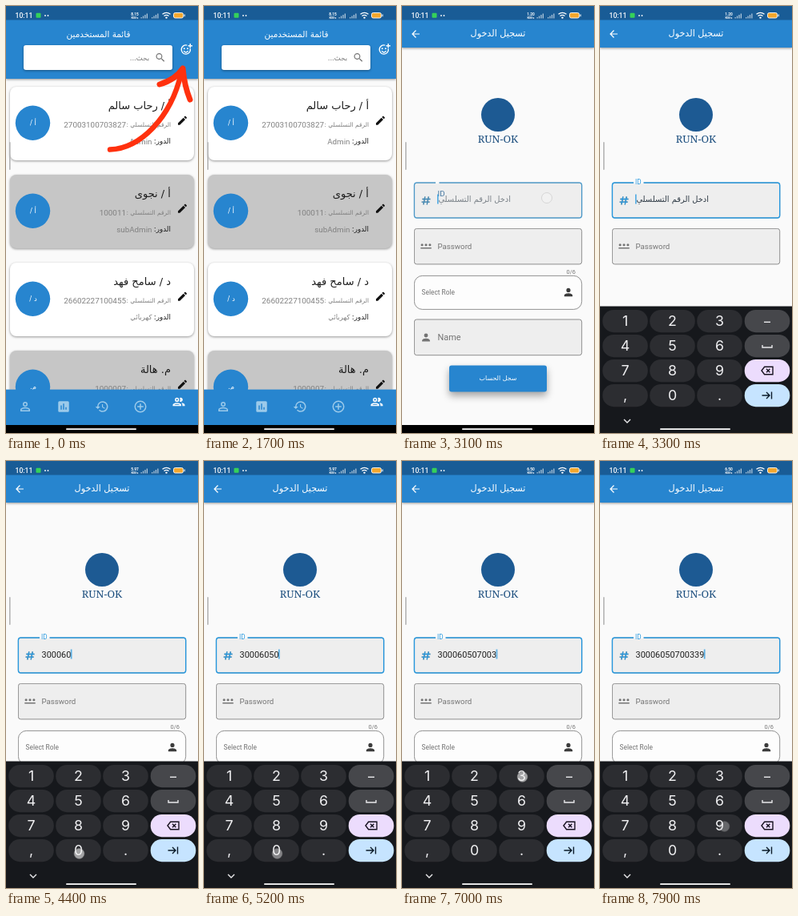
These frames come from a looping animation (240x534 px, 8000 ms). An HTML page:

```html
<!DOCTYPE html>
<html lang="ar">
<head>
<meta charset="utf-8">
<title>تسجيل الدخول</title>
<style>
html, body { margin: 0; width: 100%; height: 100%; overflow: hidden; background: #000; }
svg { display: block; width: 100vw; height: 100vh; }
text { font-family: Roboto, 'DejaVu Sans', sans-serif; }
.ar { font-family: 'DejaVu Sans', sans-serif; direction: rtl; }
.cap { font-family: Inter, sans-serif; }
.mark { font-family: 'Noto Serif', serif; }
.mid { text-anchor: middle; }
.end { text-anchor: end; }
.blue { fill: #2785cf; }
.soft { filter: drop-shadow(0 1px 1.5px rgba(0,0,0,.4)); }
.lift { filter: drop-shadow(0 5px 5px rgba(0,0,0,.35)); }
.box { fill: #eee; stroke: #757575; stroke-width: .8; }
#list, #form, #scrim, #keys, #focus, #label, #gap, #hint { animation: 8s linear infinite; }
#list, #form { transform-origin: 120px 265px; }
#list { animation-name: list; }
#scrim { animation-name: scrim; }
#form { animation-name: form; }
#keys { animation-name: keys; }
#focus { animation-name: focus; }
#label { animation-name: label; }
#gap { animation-name: gap; transform-origin: 42px 0; }
#hint { animation-name: hint; }
@keyframes list { 0%, 23% { transform: none } 26.5%, 100% { transform: scale(1.05) } }
@keyframes scrim { 0%, 23% { opacity: 0 } 25%, 100% { opacity: .6 } }
@keyframes form {
  0%, 23% { transform: scale(.85); opacity: 0 }
  24% { transform: scale(.95); opacity: .9 }
  25% { transform: scale(.988); opacity: 1 }
  26.5%, 100% { transform: none; opacity: 1 }
}
@keyframes keys { 0%, 38.9% { transform: translateY(159px) } 40.2%, 100% { transform: none } }
@keyframes focus { 0%, 38% { opacity: 0 } 38.75% { opacity: .65 } 40%, 100% { opacity: 1 } }
@keyframes label {
  0%, 38.1% { transform: translate(45px, 246.5px); fill: #6e6e6e }
  38.75% { transform: translate(44.6px, 238.5px) scale(.9); fill: #45779f }
  40.2%, 100% { transform: translate(44px, 223px) scale(.75); fill: #2a9adf }
}
@keyframes gap { 0%, 38.1% { transform: scaleX(0) } 38.75% { transform: scaleX(.36) } 40.2%, 100% { transform: none } }
@keyframes hint { 0%, 38% { opacity: 0 } 38.75% { opacity: .6 } 40.2%, 100% { opacity: 1 } }
</style>
</head>
<body>
<svg id="stage" viewBox="0 0 240 534" preserveAspectRatio="none"></svg>
<script>
const LOOP = 8000;
const stage = document.getElementById('stage');
const $ = id => document.getElementById(id);

const icons = {
  person: 'M12 12a4 4 0 1 0 0-8 4 4 0 0 0 0 8zm0 2c-2.67 0-8 1.34-8 4v2h16v-2c0-2.66-5.33-4-8-4z',
  personLine: 'M12 6a2 2 0 1 1 0 4 2 2 0 0 1 0-4zm0 9c2.7 0 5.8 1.29 6 2v1H6v-1c.2-.7 3.3-2 6-2zM12 4a4 4 0 1 0 0 8 4 4 0 0 0 0-8zm0 9c-2.67 0-8 1.34-8 4v3h16v-3c0-2.66-5.33-4-8-4z',
  people: 'M9 12a3.5 3.5 0 1 0 0-7 3.5 3.5 0 0 0 0 7zm0-5a1.5 1.5 0 1 1 0 3 1.5 1.5 0 0 1 0-3zm0 6.75c-2.34 0-7 1.17-7 3.5V19h14v-1.75c0-2.33-4.66-3.5-7-3.5zM4.34 17c.84-.58 2.87-1.25 4.66-1.25s3.82.67 4.66 1.25zM16 13.8c1.2.85 2 1.97 2 3.45V19h4v-1.75c0-2-3.5-3.17-6-3.45zM15 12a3.5 3.5 0 1 0-1.5-6.65 5.5 5.5 0 0 1 0 6.3c.46.22.96.35 1.5.35z',
  chart: 'M19 3H5a2 2 0 0 0-2 2v14a2 2 0 0 0 2 2h14a2 2 0 0 0 2-2V5a2 2 0 0 0-2-2zM9 17H7v-7h2zm4 0h-2V7h2zm4 0h-2v-4h2z',
  history: 'M13 3a9 9 0 0 0-9 9H1l4 4 4-4H6a7 7 0 1 1 2.06 4.94l-1.42 1.42A9 9 0 1 0 13 3zm-1 5v5l4.3 2.5.7-1.2-3.5-2V8z',
  add: 'M13 7h-2v4H7v2h4v4h2v-4h4v-2h-4zm-1-5a10 10 0 1 0 0 20 10 10 0 0 0 0-20zm0 18a8 8 0 1 1 0-16 8 8 0 0 1 0 16z',
  search: 'M15.5 14h-.8l-.3-.3a6.5 6.5 0 1 0-.7.7l.3.3v.8l5 5 1.5-1.5zm-6 0a4.5 4.5 0 1 1 0-9 4.5 4.5 0 0 1 0 9z',
  edit: 'M3 17.25V21h3.75L17.8 9.94l-3.75-3.75zM20.7 7a1 1 0 0 0 0-1.4l-2.3-2.3a1 1 0 0 0-1.4 0l-1.9 1.8 3.8 3.8z',
  back: 'M20 11H7.8l5.6-5.6L12 4l-8 8 8 8 1.4-1.4L7.8 13H20z',
  stars: 'M1 17h22v2.2H1zM1.500 11.500a2.500 2.500 0 1 0 5 0 2.500 2.500 0 0 0-5 0zm8 0a2.500 2.500 0 1 0 5 0 2.500 2.500 0 0 0-5 0zm8 0a2.500 2.500 0 1 0 5 0 2.500 2.500 0 0 0-5 0z'
};

const icon = (name, x, y, fill, size = 14.7) =>
  `<path d="${icons[name]}" fill="${fill}" fill-rule="evenodd" transform="translate(${x - size / 2} ${y - size / 2}) scale(${size / 24})"/>`;
const rect = (x, y, w, h, r, more) => `<rect x="${x}" y="${y}" width="${w}" height="${h}" rx="${r}" ${more}/>`;
const line = (x, y, d, color, width = 1.4) =>
  `<path d="${d}" transform="translate(${x} ${y})" fill="none" stroke="${color}" stroke-width="${width}"/>`;
const text = (str, x, y, size, fill, cls = '', more = '') =>
  `<text x="${x}" y="${y}" font-size="${size}" fill="${fill}" class="${cls}" ${more}>${str}</text>`;
const hash = color => line(30, 243.3, 'M-1.2 -5l-2 10M3.2 -5l-2 10M-4.600 -1.800h10M-5.400 1.800h10', color, 1.3);

const card = ([mark, name, serial, role], i) => `<g transform="translate(0 ${i * 110})">
  ${rect(5, 101, 230, 92, 8, `fill="${i % 2 ? '#c6c6c6' : '#fff'}" class="soft"`)}
  <circle cx="33.500" cy="146.300" r="21.700" class="blue"/>
  ${text(mark, 34, 149, 8.5, '#fff', 'ar mid')}
  ${text(`${mark} ${name}`, 206, 129, 13, '#1c1c1c', 'ar')}
  ${text('الرقم التسلسلي :', 206, 151, 7.5, '#808080', 'ar')}
  ${text(serial, 150, 151.5, 9.9, '#808080', 'end')}
  ${text('الدور:', 206, 171.5, 8.8, '#1c1c1c', 'ar')}
  ${/[a-z]/.test(role) ? text(role, 182.5, 173, 9.8, '#808080', 'end') : text(role, 182.5, 172, 8.6, '#808080', 'ar')}
  ${icon('edit', 220.5, 143.2, '#111')}</g>`;

const people = [
  ['أ /', 'رحاب سالم', '27003100703827', 'Admin'],
  ['أ /', 'نجوى', '100011', 'subAdmin'],
  ['د /', 'سامح فهد', '26602227100455', 'كهربائي'],
  ['م.', 'هالة', '1000007', 'Admin']
];

const smiley = line(225, 54, 'M1.300 -4.900a5.600 5.600 0 1 0 4 4.200M-2.800 2.200q2.700 3.600 5.400 0M5.300 -7v5.400M2.600 -4.300h5.400', '#fff') +
  '<g fill="#fff"><circle cx="222.800" cy="53.200" r="1"/><circle cx="227" cy="53.200" r="1"/></g>';

const listPage = `<g id="list">${rect(0, 0, 240, 524, 0, 'fill="#fafafa"')}
  ${people.map(card).join('')}
  ${rect(0, -20, 240, 111, 0, 'class="blue soft"')}
  ${text('قائمة المستخدمين', 115.5, 39, 10.5, '#fff', 'ar mid')}
  ${rect(22, 49, 186, 31, 3, 'fill="#fff" class="soft"')}
  ${text('بحث...', 179, 67.5, 8.5, '#777', 'ar')}
  ${icon('search', 193, 64.5, '#777')}${smiley}
  ${rect(0, 479.6, 240, 60, 0, 'class="blue"')}
  ${['personLine', 'chart', 'history', 'add'].map((n, i) => icon(n, 24 + 48 * i, 501, '#9ccaea', 18)).join('')}
  ${icon('people', 216, 495, '#fff', 18)}
  <g id="arrow" fill="none" stroke="#ff310e" stroke-linecap="round" stroke-linejoin="round">
    <path d="M130 179.500C168 178 206 140 219 84" stroke-width="6.500"/>
    <path d="M192 98Q212 92 221 78Q223 100 230 117" stroke-width="7"/></g>
  </g>${rect(0, 0, 240, 534, 0, 'id="scrim" fill="#000"')}`;

const GREY = '#747474', ACCENT = '#2a9adf';
const formPage = `<g id="form">${rect(0, 0, 240, 524, 0, 'fill="#fafafa"')}
  ${rect(0, 0, 240, 52, 0, 'class="blue soft"')}
  ${icon('back', 17, 35, '#fff')}
  ${text('تسجيل الدخول', 120, 38, 11.2, '#fff', 'ar mid')}
  <circle cx="120" cy="136" r="21" fill="#1d5a93"/>
  ${text('RUN-OK', 120, 170.5, 13, '#1d4f7f', 'mark mid')}
  ${rect(15.4, 221, 209.3, 44, 3, 'class="box"')}${hash(GREY)}
  <g id="focus">${rect(15.4, 221, 209.3, 44, 3, `fill="none" stroke="${ACCENT}" stroke-width="1.4"`)}${hash(ACCENT)}</g>
  ${rect(42, 219.8, 12.5, 2.4, 0, 'id="gap" fill="#fafafa"')}
  <text id="label" font-size="10.900">ID</text>
  <g id="hintBox"><g id="hint">${text('ادخل الرقم التسلسلي', 136, 245, 9.9, '#2b3742', 'ar')}</g></g>
  <g id="typed"></g>
  ${rect(44.2, 235.5, 1.3, 12, 0, `id="caret" fill="${ACCENT}"`)}
  ${rect(15.4, 278.4, 209.3, 44.5, 3, 'class="box"')}${icon('stars', 30, 299, GREY)}
  ${text('Password', 44.5, 304, 9.7, GREY)}
  <g id="lower">${text('0/6', 205.5, 334.5, 7.4, GREY)}
  ${rect(15.4, 337.4, 209.3, 42, 10, 'fill="#fdfdfd" stroke="#757575" stroke-width=".8"')}
  ${text('Select Role', 24.5, 361.3, 8.4, GREY)}${icon('person', 208, 358, '#3c3c3c', 15.5)}
  ${rect(15.4, 392, 209.3, 44.7, 3, 'class="box"')}${icon('person', 30, 414.5, GREY)}
  ${text('Name', 44.5, 418, 10.9, GREY)}
  ${rect(59, 449.5, 122, 33, 3, 'class="blue lift"')}
  ${text('سجل الحساب', 120, 468, 7.9, '#fff', 'ar mid')}</g></g>`;

const colX = [3, 62, 121, 180.5], rowY = [380, 411, 442, 473];
const keyRows = ['123–', '456 ', '789<', ',0.>'];
const keyFill = c => ({ '–': '#46474b', ' ': '#46474b', '<': '#ecdcfd', '>': '#c6e4ff' })[c] || '#2c2d31';
const keySpot = c => {
  const r = keyRows.findIndex(k => k.includes(c));
  return [colX[keyRows[r].indexOf(c)] + 28.5, rowY[r] + 14];
};
const keyCap = c => {
  const [x, y] = keySpot(c);
  const drawn = {
    '–': ['M-4 1.300h8', '#e9e9eb'],
    ' ': ['M-6 -1v3h12v-3', '#e9e9eb'],
    '<': ['M-7 0l3.600 -4.700h10.400v9.400h-10.400zM-1 -2.200l4.400 4.400M-1 2.200l4.400 -4.400', '#17121f'],
    '>': ['M-6.500 0h9M-1 -4l4 4l-4 4M5.500 -4.500v9', '#0b1a28']
  }[c];
  return rect(x - 28.3, y - 14, 56.6, 28.2, 14, `fill="${keyFill(c)}"`) +
    (drawn ? line(x, y, ...drawn) : text(c, x, y + 6.4, 17.8, '#f0f0f2', 'cap mid'));
};
const keyboard = `<g id="keys">${rect(0, 375.5, 240, 159, 0, 'fill="#16181c"')}
  ${[...keyRows.join('')].map(keyCap).join('')}
  ${line(34, 519, 'M-4 -2l4 4 4 -4', '#e9e9eb')}</g>`;

const bars = x => [0, 1, 2, 3].map(i => rect(x + i * 2.4, 14 - i * 1.5, 1.3, 1.5 + i * 1.5, 0, 'fill="#fff" opacity=".65"')).join('');
const speeds = [['8.15', 0, 2600], ['1.20', 2600, 3800], ['5.97', 3800, 5400], ['6.50', 5400, LOOP]];
const system = `${rect(0, 0, 240, 17.5, 0, 'fill="#0a2a50" opacity=".45"')}
  ${text('10:11', 11.5, 15, 8.6, '#fff', '', 'font-weight="500"')}
  ${rect(37.5, 8.8, 6, 6, 1, 'fill="#35d15a"')}
  <circle cx="49" cy="12" r=".9" fill="#fff"/><circle cx="52.500" cy="12" r=".9" fill="#fff"/>
  <g id="speeds">${speeds.map(s => text(s[0], 161, 11.5, 4.8, '#fff', 'mid', 'font-weight="700"')).join('')}</g>
  ${text('KB/s', 161, 16, 4.2, '#fff', 'mid', 'font-weight="700"')}
  ${bars(168.5)}${bars(182)}
  ${line(200.5, 12, 'M-5 -1.700q5 -4 10 0M-3 .600q3 -2.400 6 0', '#fff', 1.3)}<circle cx="200.500" cy="14.600" r="1.200" fill="#fff"/>
  ${rect(209.5, 8.5, 12, 6.5, 2, 'fill="#f3a72e" stroke="#fff" stroke-width=".9"')}${rect(222.6, 10.3, 1.1, 3, .5, 'fill="#fff"')}
  ${rect(4, 170, 1.6, 35, .8, 'fill="#b4b4b4"')}
  ${rect(75, 528.2, 88, 1.8, .9, 'fill="#fff"')}`;

stage.innerHTML = listPage + formPage + rect(0, 524, 240, 10, 0, 'fill="#000"') + keyboard + system + '<g id="taps"></g>';

const play = (el, frames) => el.animate(frames, { duration: LOOP, iterations: Infinity });
// Hold each value until the next stop: [[ms, value], ...]
const hold = (el, prop, stops) => play(el, [...stops, [LOOP, stops.at(-1)[1]]]
  .map(([t, v]) => ({ offset: t / LOOP, [prop]: v, easing: 'steps(1, end)' })));
const show = (el, from, to) => hold(el, 'opacity',
  [...(from ? [[0, 0]] : []), [from, 1], ...(to < LOOP ? [[to, 0]] : [])]);

const digits = '30006050700339';
const times = [3560, 3720, 3880, 4040, 4200, 4350, 4700, 5060, 6260, 6460, 6660, 6960, 7220, 7740];
const commits = times.map(t => t + 40);
const step = 6.13;

const tap = (x, y, t, len = 190) => {
  const dot = document.createElementNS(stage.namespaceURI, 'circle');
  for (const [k, v] of Object.entries({ cx: x, cy: y, r: 6.5, fill: '#f4f4f4', stroke: '#999', 'stroke-width': .5 })) dot.setAttribute(k, v);
  $('taps').append(dot);
  play(dot, [[0, 0], [t - 40, 0], [t, .6], [t + len * .6, .6], [t + len, 0], [LOOP, 0]]
    .map(([ms, opacity]) => ({ offset: ms / LOOP, opacity })));
};

[...$('speeds').children].forEach((el, i) => show(el, speeds[i][1], speeds[i][2]));
show($('arrow'), 0, 1700);
show($('hintBox'), 0, commits[0]);
hold($('lower'), 'opacity', [[0, 1], [3200, 0], [3400, 1]]);

tap(225, 50, 1750, 360);
tap(181, 240, 2980, 230);
$('typed').innerHTML = [...digits].map((d, i) => text(d, 44.5 + step * i, 245.5, 10.9, '#1f1f1f')).join('');
[...digits].forEach((d, i) => {
  const [x, y] = keySpot(d);
  tap(x + (d === '9' ? 6 : 1), y + (d === '0' ? 4 : 1), times[i], 200);
  show($('typed').children[i], commits[i], LOOP);
});

// The caret restarts its half-second blink on every digit
const starts = [3060, ...commits];
const blink = [[0, 0]];
starts.forEach((from, i) => {
  const end = starts[i + 1] ?? LOOP;
  for (let t = from, on = 1; t < end; t += 500, on = 1 - on) blink.push([t, on]);
});
hold($('caret'), 'opacity', blink);
hold($('caret'), 'transform', [[0, 'translateX(0px)'], ...commits.map((t, i) => [t, `translateX(${step * (i + 1)}px)`])]);
</script>
</body>
</html>
```
